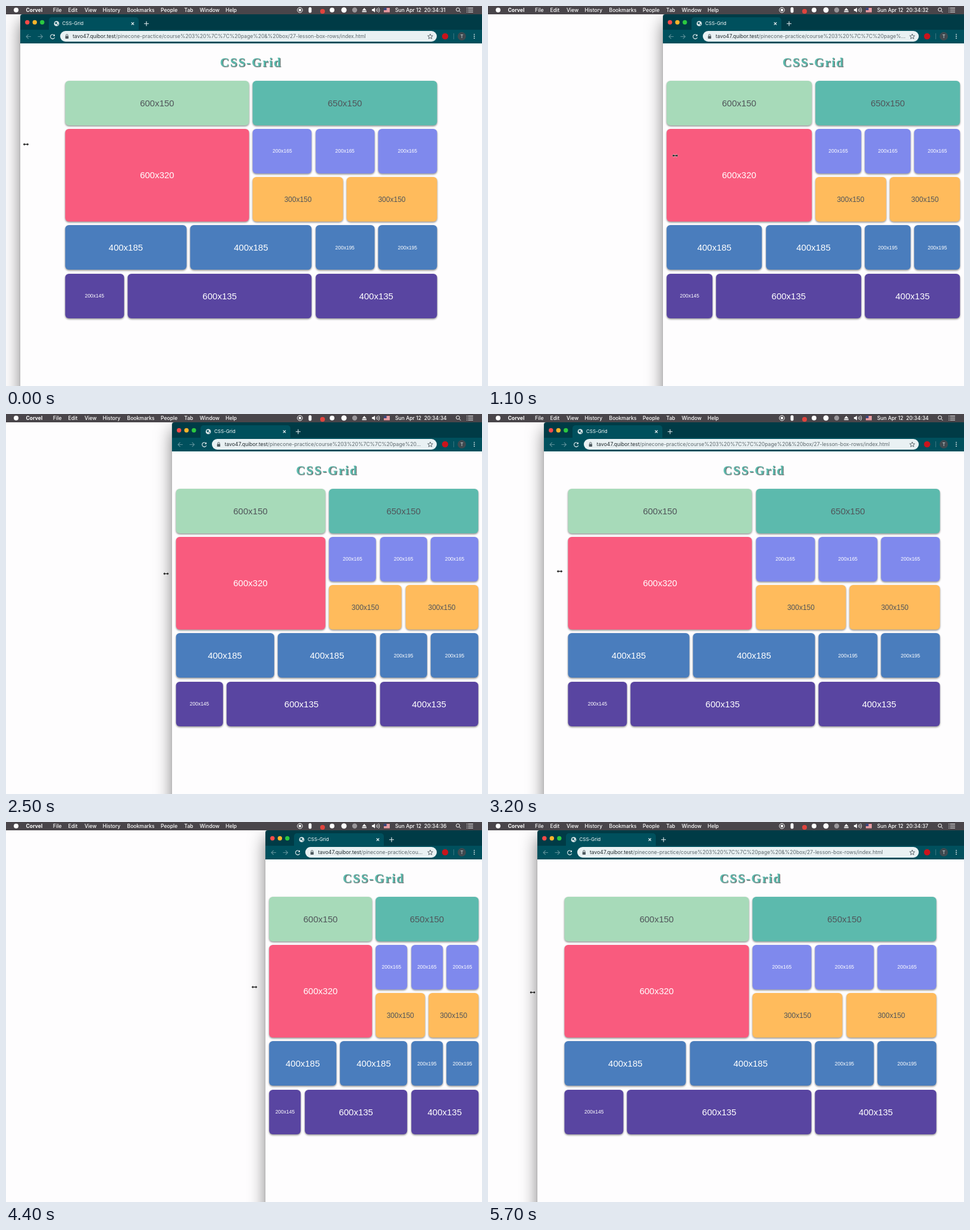
Animation of 800x640 px, one loop 5.8 s. Source, as an HTML page:

```html
<!DOCTYPE html>
<html lang="en">
<head>
<meta charset="utf-8">
<title>Grid resize</title>
<style>
html, body { margin: 0; width: 100%; height: 100%; overflow: hidden; background: #fefdfe; }
#stage { position: relative; width: 800px; height: 640px; overflow: hidden; font: 8.6px Inter, Roboto, sans-serif; }
#stage > *, #win > * { position: absolute; }
#bar { left: 0; top: 0; width: 800px; height: 13.5px; background: #49454a; color: #fff; font-weight: 500; line-height: 14px; }
#bar span { position: absolute; white-space: pre; }
#bar b { font-weight: 700; }
#win { right: 0; top: 13.5px; height: 660px; background: #fefdfe; border-radius: 4px 0 0 0;
  box-shadow: 0 12px 28px rgba(0,0,0,.5), 0 0 1px rgba(0,0,0,.6); }
#strip { inset: 0 0 auto; height: 27px; background: #003b46; border-radius: 4px 0 0 0; }
#tools { inset: 26.5px 0 auto; height: 23px; background: #00505d; }
#tab { left: 48px; top: 5.5px; width: 151px; height: 22px; background: #00505d; border-radius: 5px 5px 0 0; }
#name { left: 71px; top: 10px; font-size: 8px; line-height: 11px; color: #fff; }
#url { left: 67px; right: 76px; top: 28.5px; height: 18px; border-radius: 9px; background: #e9f1f3; }
#url div { position: absolute; left: 21.5px; right: 22px; line-height: 18px; color: #5d686d;
  white-space: nowrap; overflow: hidden; text-overflow: ellipsis; }
#url b { font-weight: 400; color: #20292d; }
svg { left: 0; top: 0; overflow: visible; fill: none; }
h1 { left: 0; right: 0; top: 69px; margin: 0; text-align: center; color: #5cbaad; line-height: 24px;
  font: bold 21px/24px "Liberation Serif", "Times New Roman", serif; letter-spacing: 1.9px; text-shadow: 1px 1px 1px #555; }
#grid { left: 50%; top: 112px; width: min(625px, 100% - 12.5px); transform: translateX(-50%); display: grid;
  grid-template-columns: repeat(12, minmax(0, 1fr)); grid-auto-rows: 75px; gap: 6.25px;
  font-family: "Liberation Sans", Arial, sans-serif; color: #fff; }
#grid div { display: flex; align-items: center; justify-content: center; border-radius: 6.25px;
  box-shadow: 0 1.5px 3px rgba(0,0,0,.22), 0 1.5px 3px rgba(0,0,0,.26); }
</style>
</head>
<body>
<div id="stage">
  <div id="win">
    <div id="strip"></div>
    <div id="tools"></div>
    <div id="tab"></div>
    <div id="name">CSS-Grid</div>
    <div id="url"><div><b>tavo47.quibor.test</b>/pinecone-practice/course%203%20%7C%7C%20page%20&amp;%20box/27-lesson-box-rows/index.html</div></div>
    <svg width="220" height="50">
      <circle cx="11.8" cy="13.5" r="3.7" fill="#fc4b48"/>
      <circle cx="24.3" cy="13.5" r="3.7" fill="#fdb32b"/>
      <circle cx="36.8" cy="13.5" r="3.7" fill="#2bc840"/>
      <circle cx="61" cy="15.7" r="4.4" fill="#d5e2e5"/>
      <path d="M58 14l3-1 1 2-2 2zM62 17l2-1-1 3z" fill="#00505d"/>
      <g stroke="#e8f0f2" stroke-width="1.1">
        <path d="M186.7 13.5l4.4 4.4m0-4.4l-4.4 4.4M208 15.7h8m-4-4v8"/>
        <path d="M57.2 35.3a3.7 3.7 0 1 0 .6 3.6"/>
        <path d="M58 33.5v3.2h-3.2z" fill="#e8f0f2" stroke="none"/>
        <path d="M18 37.5h-8m3.7-3.7l-3.7 3.7 3.7 3.7M29.500 37.500h8m-3.700-3.700l3.700 3.700-3.700 3.700" stroke="#5f929b"/>
      </g>
      <rect x="75.700" y="36.500" width="5.400" height="4.400" rx=".6" fill="#4f5a5f"/>
      <path d="M76.800 36.500v-1.200a1.600 1.600 0 0 1 3.200 0v1.200" stroke="#4f5a5f"/>
    </svg>
    <h1>CSS-Grid</h1>
    <div id="grid"></div>
  </div>
  <svg width="800" height="64">
    <path d="M713 47l1.200 2.900 3.100.2-2.400 2 .8 3-2.700-1.600-2.700 1.600.8-3-2.400-2 3.100-.2z" stroke="#4f5a5f" stroke-width=".9"/>
    <circle cx="738" cy="51" r="5.300" fill="#c9141c"/>
    <path d="M752.500 46v10" stroke="#3a7882"/>
    <circle cx="766" cy="51" r="7" fill="#3f4a50"/>
    <text x="766" y="54" text-anchor="middle" fill="#dfe6e8" font-size="8">T</text>
    <path d="M787 47.800v.01m0 3.190v.01m0 3.190v.01" stroke="#e8f0f2" stroke-width="1.800" stroke-linecap="round"/>
  </svg>
  <div id="bar"></div>
  <svg width="800" height="14">
    <g fill="#fff">
      <circle cx="17" cy="6.800" r="4"/>
      <circle cx="494" cy="6.800" r="2.200"/>
      <rect x="508.500" y="2" width="5" height="9.600" rx="2.500"/>
      <circle cx="548" cy="6.800" r="4"/>
      <circle cx="568" cy="6.800" r="4.500"/>
      <path d="M598.500 7.400l3.700-4.200 3.700 4.200zM598.500 8.600h7.400v1.600h-7.400z"/>
      <path d="M615 5.300h2l3-2.500v8l-3-2.500h-2z"/>
    </g>
    <circle cx="532" cy="9" r="4" fill="#e0443e"/>
    <circle cx="586" cy="6.800" r="4.200" fill="#99969a"/>
    <g stroke="#fff">
      <circle cx="494" cy="6.800" r="4.300"/>
      <path d="M622 4.800q1.500 2 0 4M624 3.600q2.600 3.200 0 6.400M626 2.500q3.600 4.300 0 8.600" stroke-width=".9"/>
      <circle cx="759.500" cy="6" r="2.900"/>
      <path d="M761.600 8.200l2.700 2.700M774 3.500h1.300m1.200 0h8.500M774 6.800h1.300m1.200 0h8.500M774 10.100h1.300m1.200 0h8.500"/>
    </g>
    <rect x="635" y="3" width="10" height="7.500" fill="#f4eeee"/>
    <path d="M635 3.600h10m-10 2.100h10m-10 2.100h10m-10 2.100h10" stroke="#cf4350"/>
    <rect x="635" y="3" width="4.600" height="4" fill="#39477f"/>
  </svg>
  <svg id="cursor" width="1" height="1">
    <path d="M-5 0l3-2.700v1.800h4v-1.800l3 2.700-3 2.700v-1.800h-4v1.800z" fill="#111" stroke="#fff" stroke-width=".5"/>
  </svg>
</div>
<script>
const el = id => document.getElementById(id);
const add = (parent, tag, text, css) => {
  const e = document.createElement(tag);
  e.textContent = text;
  e.style.cssText = css;
  return parent.appendChild(e);
};

const menu = { Corvel: 33.5, File: 79, Edit: 104.5, View: 132, History: 162.5, Bookmarks: 203.5,
  People: 260, Tab: 299.5, Window: 325.5, Help: 369 };
for (const [word, x] of Object.entries(menu))
  add(el('bar'), 'span', word, `left:${x}px;` + (word === 'Corvel' ? 'font-weight:700' : ''));
const clock = add(el('bar'), 'span', '', 'left:654px');

// label, column span, colour
const cells = [
  ['600x150', 6, '#a7dab9'], ['650x150', 6, '#5cbaad'], ['600x320', 6, '#f95b7e'],
  ...Array(3).fill(['200x165', 2, '#7f89ed']),
  ...Array(2).fill(['300x150', 3, '#ffbb5c']),
  ...Array(2).fill(['400x185', 4, '#4a7dbd']),
  ...Array(2).fill(['200x195', 2, '#4a7dbd']),
  ['200x145', 2, '#5945a1'], ['600x135', 6, '#5945a1'], ['400x135', 4, '#5945a1']
];
for (const [label, span, color] of cells) {
  const size = span === 2 ? 8.5 : span === 3 ? 12 : 15;
  add(el('grid'), 'div', label, `grid-column:span ${span};background:${color};font-size:${size}px;`
    + (label.endsWith('x150') ? 'color:#50555a;' : '')
    + (label === '600x320' ? 'grid-row:span 2' : ''));
}

// time, window edge, cursor x, cursor y
const keys = [
  [0, 23.5, 33.5, 233], [600, 165, 183, 243], [1100, 294, 314.5, 252], [1900, 487.5, 502.5, 273],
  [2050, 503, 505, 273], [2400, 321, 309, 270], [2500, 279, 269, 269], [3000, 102, 92, 265],
  [3100, 88, 95, 264], [3200, 94, 120.5, 265], [3600, 294, 318, 271], [4150, 480, 478, 277],
  [4400, 436, 417.5, 278], [4800, 285, 268, 281], [5200, 143, 130, 284], [5700, 82.5, 75, 287]
];
const slope = (i, c) => {
  const a = keys[Math.max(i - 1, 0)], b = keys[Math.min(i + 1, keys.length - 1)];
  return (b[c] - a[c]) / (b[0] - a[0]);
};
// Smooth cubic through the keys
function track(t, c) {
  let i = 0;
  while (i < keys.length - 2 && keys[i + 1][0] <= t) i++;
  const a = keys[i], b = keys[i + 1], d = b[0] - a[0], u = (t - a[0]) / d, v = 1 - u;
  return a[c] * v * v * (1 + 2 * u) + b[c] * u * u * (3 - 2 * u)
    + d * u * v * (slope(i, c) * v - slope(i + 1, c) * u);
}

function draw(now) {
  const t = Math.floor(now % 5800 / 100) * 100;
  el('win').style.left = track(t, 1) + 'px';
  el('cursor').style.transform = `translate(${track(t, 2)}px, ${track(t, 3)}px)`;
  clock.textContent = 'Sun Apr 12  20:34:' + (31 + Math.floor((t + 695) / 975));
}
const start = performance.now();
(function tick() {
  draw(performance.now() - start);
  requestAnimationFrame(tick);
})();
</script>
</body>
</html>
```
